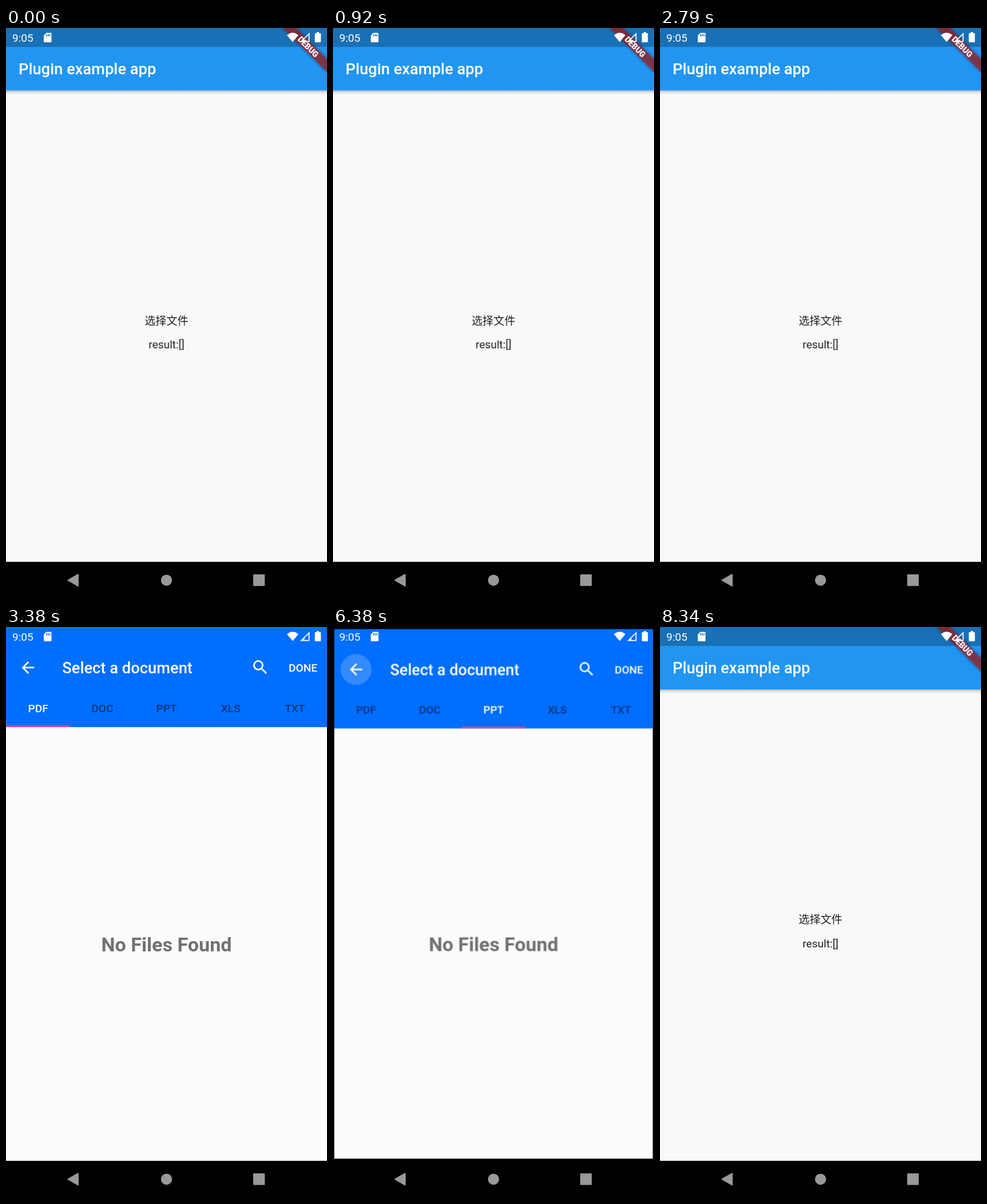
Recreate the animation shown at these times as an HTML page. Size 561 px wide and 998 px high, loop 8.39 s.

```html
<!DOCTYPE html>
<html lang="zh-CN">
<head>
<meta charset="utf-8">
<title>File picker demo</title>
<style>
  html, body { margin: 0; width: 100%; height: 100%; overflow: hidden; background: #000; }
  svg { display: block; width: 561px; height: 998px; }
  text { font-family: Roboto, "Noto Sans CJK SC", "Noto Sans CJK", sans-serif; font-size: 19.1px; }
  .title { font-size: 27.3px; font-weight: 500; fill: #fff; }
  .label { font-weight: 500; fill: #fff; }
  .mid { text-anchor: middle; }
  .empty { font-size: 34.1px; font-weight: 700; fill: #717171; }
  .page { transform-origin: 280.5px 466.5px; }
  #ripple { transform-origin: 38.4px 71px; opacity: 0; }
</style>
</head>
<body>
<svg viewBox="0 0 561 998">
  <defs>
    <linearGradient id="shade" x2="0" y2="1">
      <stop offset="0" stop-color="#000" stop-opacity=".3"/>
      <stop offset=".4" stop-color="#000" stop-opacity=".1"/>
      <stop offset="1" stop-color="#000" stop-opacity="0"/>
    </linearGradient>
    <filter id="soft" x="-20%" y="-80%" width="140%" height="260%">
      <feGaussianBlur stdDeviation="3"/>
    </filter>
    <clipPath id="screen"><path d="M0 0H561V933H0Z"/></clipPath>
  </defs>

  <rect width="561" height="998"/>

  <g clip-path="url(#screen)">
    <g id="home" class="page">
      <rect width="561" height="933" fill="#f9f9fb"/>
      <rect y="109" width="561" height="8" fill="url(#shade)"/>
      <rect width="561" height="109" fill="#2095f2"/>
      <rect width="561" height="33" fill="#1a70b5"/>
      <text class="title" x="22" y="81">Plugin example app</text>
      <text class="mid" x="280.5" y="518" fill="#1f1f1f">选择文件</text>
      <text class="mid" x="280.5" y="560" fill="#1f1f1f">result:[]</text>
      <g transform="translate(561) rotate(45)">
        <rect x="-55" y="38.2" width="110" height="16.4" opacity=".4" filter="url(#soft)"/>
        <rect x="-55" y="38.2" width="110" height="16.4" fill="#b71c1c" fill-opacity=".63"/>
        <text class="mid" y="51.3" fill="#fff" style="font-size:13.9px;font-weight:900">DEBUG</text>
      </g>
    </g>

    <g id="picker" class="page" opacity="0">
      <rect width="561" height="933" fill="#fcfcfc"/>
      <g id="track"></g>
      <rect width="561" height="175" fill="#006eff"/>
      <circle id="ripple" cx="38.4" cy="71" r="27.3" fill="#fff"/>
      <g fill="#fff">
        <path transform="translate(22 54.6) scale(1.365)" d="M20 11H7.83l5.59-5.59L12 4l-8 8 8 8 1.41-1.41L7.83 13H20z"/>
        <path transform="translate(428 54) scale(1.365)" d="M15.5 14h-.79l-.28-.27A6.5 6.5 0 1 0 13.73 14.43l.27.28v.79l5 4.99L20.49 19zM9.5 14a4.5 4.5 0 1 1 0-9 4.5 4.5 0 0 1 0 9z"/>
      </g>
      <text class="title" x="98.3" y="81">Select a document</text>
      <text class="label" x="494" y="78">DONE</text>
      <g id="tabs"></g>
      <rect id="bar" y="171.8" width="112.2" height="2.8" fill="#e8458a"/>
    </g>
  </g>

  <g fill="#fff">
    <text x="11" y="24">9:05</text>
    <path fill-rule="evenodd" d="M70.5 8.5H78Q79.5 8.5 79.5 10V23.5Q79.5 25 78 25H67.500Q66 25 66 23.500V13ZM70 11v3.500h1.700V11zM73 11v3.500h1.700V11zM76 11v3.500h1.700V11z"/>
    <path d="M491 12.500Q501 4 511 12.500L501 24.500Z"/>
    <path fill-rule="evenodd" d="M530.500 8V24.500H514ZM528.700 12.300L521.500 19.500V22.700H528.700Z"/>
    <path d="M543 7h4v2h2q1.300 0 1.300 1.300V23.700q0 1.300-1.300 1.300h-8q-1.300 0-1.300-1.300V10.300q0-1.300 1.300-1.300h2z"/>
  </g>

  <rect y="933" width="561" height="65"/>
  <g fill="#999997" stroke="#999997" stroke-linejoin="round">
    <path stroke-width="2" d="M108.500 965.200L126 955.200V975.200Z"/>
    <circle cx="280.500" cy="965.200" r="9.700" stroke="none"/>
    <rect x="433" y="956" width="18.300" height="18.300" stroke-width="2"/>
  </g>
</svg>

<script>
const LOOP = 8390, WIDTH = 561, TAB = WIDTH / 5;
const OPEN = 2850, CLOSE = 6344, PRESS = 6180;
const TAPS = [[3780, 1], [4660, 2]];
const HOLD = 'steps(1)', QUINT = 'cubic-bezier(.22,1,.36,1)', STANDARD = 'cubic-bezier(.4,0,.2,1)';
const $ = id => document.getElementById(id);

// rows: [ms, value, easing towards the next row]
function loop(el, prop, rows) {
  const frames = rows.map(([ms, value, easing = HOLD]) => ({ offset: ms / LOOP, [prop]: value, easing }));
  frames.push({ offset: 1, [prop]: rows[rows.length - 1][1] });
  el.animate(frames, { duration: LOOP, iterations: Infinity });
}

// Window zoom: quick start, very long settle, as two joined curves
function zoom(start, from, to) {
  const at = k => `scale(${from + (to - from) * k})`;
  return [
    [start, at(0), 'cubic-bezier(.3,0,.8,.15)'],
    [start + 400 / 6, at(.4), 'cubic-bezier(.05,.7,.1,1)'],
    [start + 400, at(1)]
  ];
}

// Moves from one tab index to the next at each tap
function slide(step, ms, easing) {
  const at = i => `translateX(${i * step}px)`;
  return [[0, at(0)], ...TAPS.flatMap(([t, i]) => [[t, at(i - 1), easing], [t + ms, at(i)]])];
}

function addText(parent, cls, x, y, str) {
  const el = document.createElementNS('http://www.w3.org/2000/svg', 'text');
  el.setAttribute('class', cls);
  el.setAttribute('x', x);
  el.setAttribute('y', y);
  el.textContent = str;
  return parent.appendChild(el);
}

['PDF', 'DOC', 'PPT', 'XLS', 'TXT'].forEach((name, i) => {
  addText($('track'), 'empty mid', WIDTH * (i + .5), 567, 'No Files Found');
  const tab = addText($('tabs'), 'label mid', TAB * (i + .5), 149, name);
  loop(tab, 'fill', [[0, 0], ...TAPS].map(([t, on]) => [t, on === i ? '#fff' : '#05367c']));
});

loop($('home'), 'transform', [[0, 'scale(1)'], ...zoom(OPEN, 1, 1.15), ...zoom(CLOSE, 1.1, 1)]);
loop($('home'), 'opacity', [[0, 1], [OPEN + 400, 0], [CLOSE + 40, 1]]);
loop($('picker'), 'transform', [[0, 'scale(.85)'], ...zoom(OPEN, .85, 1), ...zoom(CLOSE, 1, .9)]);
loop($('picker'), 'opacity', [
  [0, 0], [OPEN + 50, 0, 'linear'], [OPEN + 100, 1],
  [CLOSE + 40, 1, 'linear'], [CLOSE + 90, 0]
]);
loop($('track'), 'transform', slide(-WIDTH, 200, QUINT));
loop($('bar'), 'transform', slide(TAB, 300, STANDARD));
loop($('ripple'), 'transform', [[0, 'scale(.3)'], [PRESS, 'scale(.3)', STANDARD], [PRESS + 180, 'scale(1)']]);
loop($('ripple'), 'opacity', [[0, 0], [PRESS, 0, 'linear'], [PRESS + 75, .2], [CLOSE + 100, 0]]);
</script>
</body>
</html>
```
